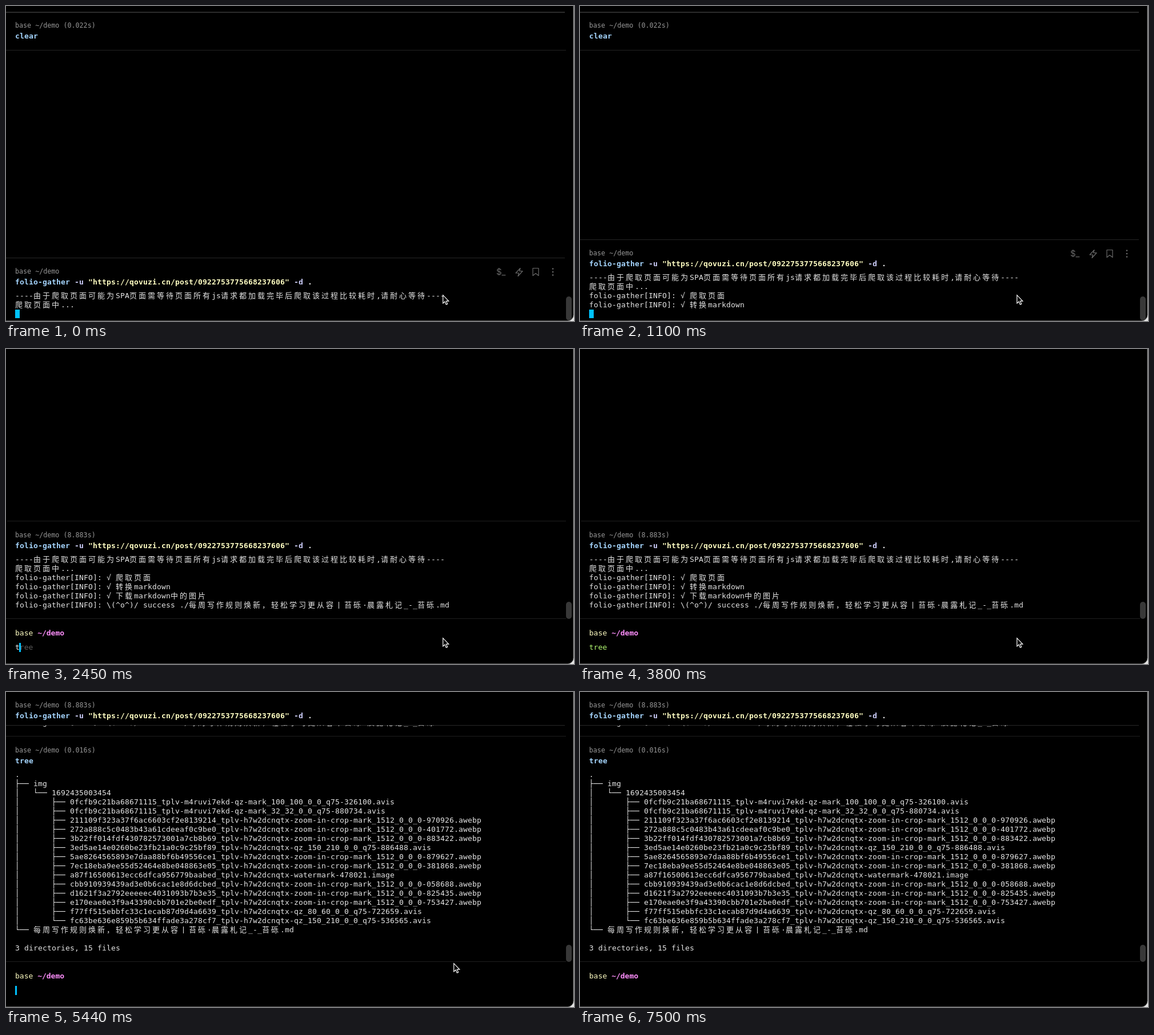
An HTML page with a canvas that plays this animation: 994x552 px, repeating every 7.64 s.

```html
<!DOCTYPE html>
<html lang="zh-CN">
<head>
<meta charset="utf-8">
<title>Terminal</title>
<style>
  html, body { margin: 0; width: 100%; height: 100%; overflow: hidden; background: #000; }
  canvas { display: block; }
</style>
</head>
<body>
<canvas id="stage" width="994" height="552"></canvas>
<script>
const g = document.getElementById('stage').getContext('2d');
const LOOP = 7640, CELL = 8, ROW = 16, LEFT = 16;
const MONO = '"DejaVu Sans Mono", "Noto Sans CJK SC", "Noto Sans CJK", monospace';
const BLUE = '#a5d5fe', LILAC = '#d0d1fe', YELLOW = '#fefdc2', PINK = '#ff8ffd',
      GREEN = '#b4fa72', WHITE = '#f1f1f1', TEXT = '#e4e4e4', GREY = '#969696', CARET = '#00c2ff';

const TOOL = 'folio-gather';
const ARTICLE = '每周写作规则焕新，轻松学习更从容丨苔砾·晨露札记_-_苔砾.md';
const info = s => `${TOOL}[INFO]: ${s}`;

let seed = 7;
function digits(count, base = 10) {
  let s = '';
  while (s.length < count) {
    seed = (seed * 16807) % 2147483647;
    s += Math.floor(seed / 2147483647 * base).toString(base);
  }
  return s;
}

const PULL = [[TOOL, BLUE], [' -u ', LILAC],
  [`"https://qovuzi.cn/post/${digits(19)}"`, YELLOW], [' -d ', LILAC], ['.', WHITE]];
const LOG = [
  '----由于爬取页面可能为SPA页面需等待页面所有js请求都加载完毕后爬取该过程比较耗时,请耐心等待----',
  '爬取页面中...',
  info('√ 爬取页面'),
  info('√ 转换markdown'),
  info('√ 下载markdown中的图片'),
  info('\\(^o^)/ success ./' + ARTICLE)
];

// Image variants by letter, and the order in which the folder lists them
const VARIANTS = {
  z: n => `zoom-in-crop-mark_1512_0_0_0-${n}.awebp`,
  t: n => `qz_150_210_0_0_q75-${n}.avis`,
  s: n => `qz_80_60_0_0_q75-${n}.avis`,
  w: n => `watermark-${n}.image`
};
const ORDER = [...'zzztzzwzzzst'];
const ids = ORDER.map(() => digits(32, 16)).sort();
const authorId = '0' + digits(18, 16);
const FILES = [
  ...['100_100', '32_32'].map(size =>
    `${authorId}_tplv-m4ruvi7ekd-qz-mark_${size}_0_0_q75-${digits(6)}.avis`),
  ...ORDER.map((kind, i) => `${ids[i]}_tplv-h7w2dcnqtx-${VARIANTS[kind](digits(6))}`)
];
const TREE = ['.', '├── img', '│   └── 1692435003454',
  ...FILES.map((name, i) => `│       ${i < FILES.length - 1 ? '├' : '└'}── ${name}`),
  '└── ' + ARTICLE, '', '3 directories, 15 files'];

// Moments at which the prompt caret toggles, and at which a letter is typed
const BLINKS = [1250, 1850, 2300, 3800, 4250, 4700, 5150, 5740, 6190, 6640, 7230, 7500];
const KEYS = [2450, 2900, 3200, 3350];
const passed = (times, t) => times.filter(time => t >= time).length;

// Pointer positions, one every 150 ms, before it leaves the window
const PATH = [[764, 506], [783, 475], [792, 445], [792, 446], [813, 477], [860, 502],
  [908, 540], [946, 551]];
const pointerAt = t => PATH[Math.max(0, Math.floor((t - 5290) / 150))];

function rect(x, y, w, h, color) {
  g.fillStyle = color;
  g.fillRect(x, y, w, h);
}

function text(s, x, y, color, size = 13, weight = '') {
  g.font = `${weight} ${size}px ${MONO}`;
  g.fillStyle = color;
  g.fillText(s, x, y);
}

// Terminal grid: one cell per character, two for wide ones
function cells(s, x, y, color, weight) {
  for (const c of s) {
    if (c !== ' ') text(c, x, y, color, 13, weight);
    x += c > '\u2e7f' ? 2 * CELL : CELL;
  }
  return x;
}

function block(top, time, command, rows = []) {
  text('base ~/demo' + (time ? ` (${time}s)` : ''), LEFT, top + 28, GREY, 11.7);
  let x = LEFT;
  for (const [s, color] of command) x = cells(s, x, top + 47, color, 'bold');
  rows.forEach((s, i) => cells(s, LEFT, top + 71 + i * ROW, TEXT));
}

function poly(points) {
  g.beginPath();
  points.forEach(([x, y]) => g.lineTo(x, y));
  g.closePath();
}

function icons(top) {
  g.save();
  g.translate(0, top);
  g.strokeStyle = g.fillStyle = '#6a6a6a';
  g.lineWidth = 1.2;
  g.lineJoin = 'round';
  g.font = '15px Inter, sans-serif';
  g.fillText('$_', 858, 30);
  poly([[900, 18.5], [892, 27], [897.5, 27], [896, 32.5], [904, 23.5], [898.5, 23.5]]);
  g.stroke();
  poly([[922, 31.5], [922, 18.5], [932, 18.5], [932, 31.5], [927, 27.5]]);
  g.stroke();
  for (let i = 0; i < 3; i++) {
    g.beginPath();
    g.arc(957, 19.5 + i * 5.5, 1.3, 0, 7);
    g.fill();
  }
  g.restore();
}

function pointer([x, y]) {
  g.save();
  g.translate(x + 0.7, y + 0.7);
  poly([[0, 0], [0, 14.3], [3.3, 11.3], [5.6, 16.6], [7.9, 15.6], [5.7, 10.5], [10, 10.5]]);
  g.fillStyle = '#000';
  g.fill();
  g.strokeStyle = '#fff';
  g.lineWidth = 1.2;
  g.stroke();
  g.restore();
}

function frame() {
  rect(0, 0, 994, 552, '#e4e4e4');
  g.beginPath();
  g.roundRect(-20, -20, 1013, 571.5, 10);
  g.fillStyle = '#000';
  g.fill();
  g.strokeStyle = '#555';
  g.lineWidth = 1;
  g.stroke();
}

function scrollThumb(y, h) {
  g.beginPath();
  g.roundRect(980, y, 10, h, 5);
  g.fillStyle = '#383838';
  g.fill();
}

function running(t) {
  const lines = 2 + passed([500, 1100], t);
  const top = 473 - lines * ROW;
  rect(0, 10, 978, 2, '#2c2c2c');
  block(10, '0.022', [['clear', BLUE]]);
  rect(0, 77, 980, 1, '#222');
  rect(0, top, 978, 1, '#262626');
  block(top, '', PULL, LOG.slice(0, lines));
  icons(top);
  rect(LEFT, 532, 8, 15, CARET);
  scrollThumb(509, 42);
}

function prompt(t) {
  rect(0, 472, 980, 1, '#1e1e1e');
  scrollThumb(443, 30);
  text('base', LEFT, 502, YELLOW);
  const step = g.measureText('m').width;
  text('~/demo', LEFT + 5 * step, 502, PINK, 13, 'bold');
  const n = t < 4250 ? passed(KEYS, t) : 0, caretX = LEFT + n * step;
  if (n) {
    // Only complete command names turn green
    text('tree'.slice(0, n), LEFT, 527, n % 2 ? WHITE : GREEN);
    text('tree'.slice(n), caretX, 527, '#5c5c5c');
  }
  if (passed(BLINKS, t) % 2) rect(Math.floor(caretX), 515, 3, 16, CARET);
}

function listing() {
  // The end of the log shows just below the sticky header
  g.save();
  g.beginPath();
  g.rect(0, 58, 980, 10);
  g.clip();
  cells(LOG[5], LEFT, 58, TEXT);
  g.restore();
  rect(0, 58, 978, 1, 'rgba(80, 80, 80, 0.5)');
  block(-1, '8.883', PULL);
  rect(0, 77, 980, 1, '#1e1e1e');
  block(78, '0.016', [['tree', BLUE]], TREE);
}

function draw(t) {
  frame();
  if (t < 1250) running(t);
  else {
    if (t < 4250) {
      rect(2, 301, 978, 1, '#1e1e1e');
      block(302, '8.883', PULL, LOG);
    } else listing();
    prompt(t);
    if (t >= 5590 && t < 6040) icons(78);
  }
  const tip = pointerAt(t);
  if (tip) pointer(tip);
}

const start = performance.now();
function tick() {
  draw((performance.now() - start) % LOOP);
  requestAnimationFrame(tick);
}
tick();
</script>
</body>
</html>
```
